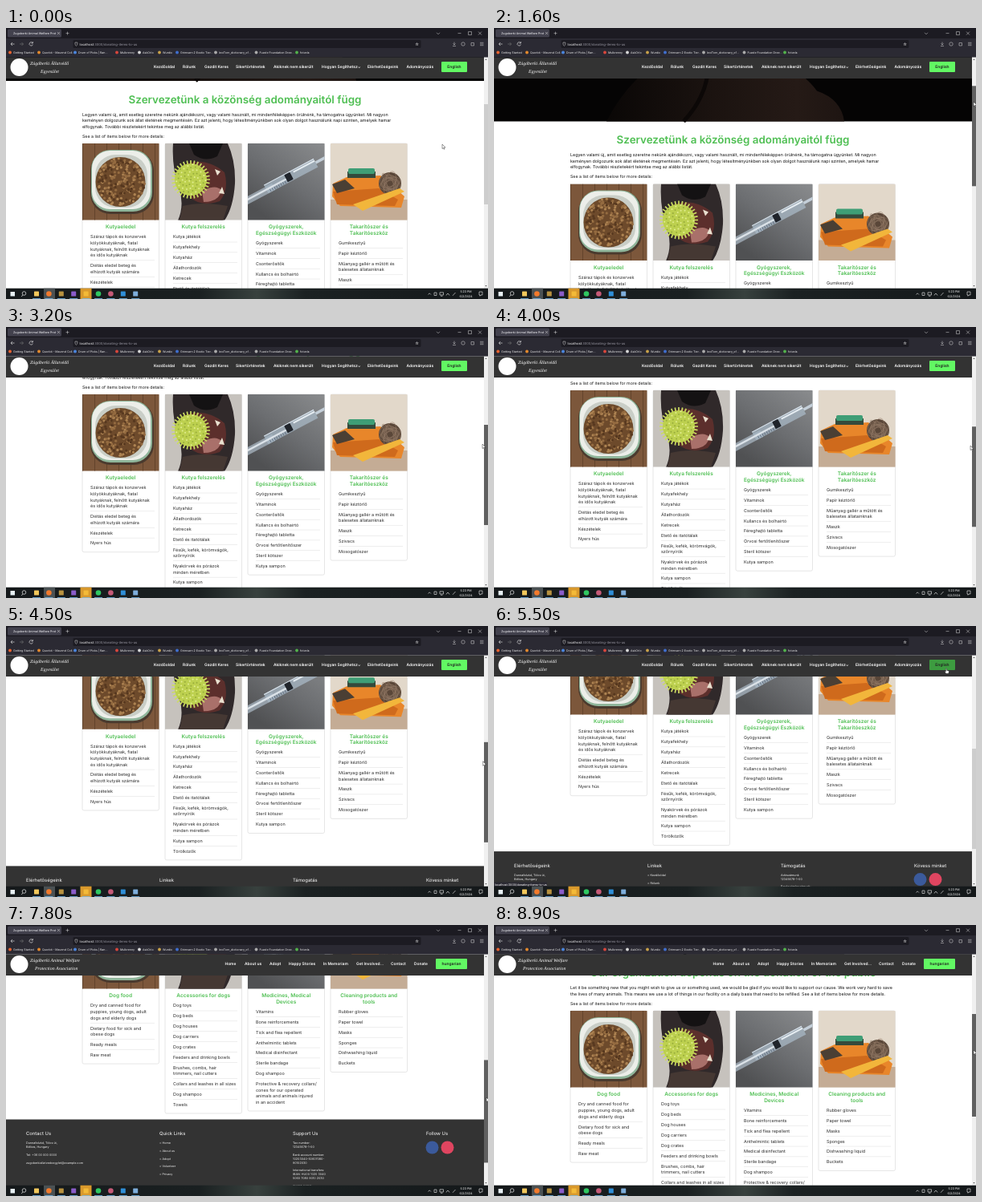
An HTML page for the animation above (9 s loop, 600x338 px).

```html
<!DOCTYPE html>
<html lang="hu">
<head>
<meta charset="utf-8">
<title>Donating items</title>
<style>
html, body { margin: 0; width: 100%; height: 100%; overflow: hidden; background: #fff; }
svg { display: block; }
#stage { width: 100vw; height: 100vh; }
text { font-family: Inter, "Open Sans", sans-serif; text-rendering: geometricPrecision; white-space: pre; }
.script { font-family: "Liberation Serif", serif; font-style: italic; }
</style>
</head>
<body>
<script>
const GREEN = '#4fbf53', INK = '#2b2b2b';
const range = n => [...Array(n).keys()];
let seed = 7;
const rand = () => (seed = seed * 16807 % 2147483647) / 2147483647;

const rect = (x, y, w, h, fill, extra = '') =>
  `<rect x="${x}" y="${y}" width="${w}" height="${h}" fill="${fill}" ${extra}/>`;
const dot = (x, y, r, fill) => `<circle cx="${x}" cy="${y}" r="${r}" fill="${fill}"/>`;
const shape = (d, fill) => `<path d="${d}" fill="${fill}"/>`;
const line = (d, color, w = .6) => `<path d="${d}" fill="none" stroke="${color}" stroke-width="${w}"/>`;
// y is the middle of the capitals
const text = (x, y, size, str, fill = INK, extra = '') =>
  `<text x="${x}" y="${y + size * .36}" font-size="${size}" fill="${fill}" ${extra}>${str.replace(/&/g, '&amp;').replace(/>/g, '&gt;')}</text>`;
const BOLD = 'font-weight="600"', MID = 'text-anchor="middle"';

const photos = [
  // bowl of dry food on a wooden floor
  () => rect(0, 0, 96, 96, '#7c573b') +
    range(7).map(i => rect(i * 15, 0, .7, 96, '#583c26')).join('') +
    rect(10, 9, 79, 79, '#4a3a2e', 'rx="25"') + rect(11, 8, 76, 77, '#8fb59a', 'rx="24"') +
    rect(12, 9, 73, 73, '#eceee9', 'rx="22"') + rect(16, 14, 65, 66, '#c9cec7', 'rx="25"') +
    dot(47.5, 48, 31, '#6d4a2b') +
    range(220).map(() => {
      const a = rand() * 6.283, r = 30 * Math.sqrt(rand());
      return dot(47.5 + r * Math.cos(a), 48 + r * Math.sin(a), 1.6, ['#946b40', '#57381f', '#ad8352'][rand() * 3 | 0]);
    }).join(''),
  // dog with a spiky ball
  () => rect(0, 0, 96, 96, '#c6c2bd') +
    shape('M10 0H78Q88 22 87 50Q85 80 74 96H16Q24 78 18 58Q8 30 10 0Z', '#30292a') +
    shape('M30 0H72L65 16Q50 24 36 14Z', '#141213') +
    shape('M24 26Q50 16 74 36Q80 58 68 72Q44 80 30 66Z', '#5c2f2c') +
    shape('M46 60Q62 50 70 58Q68 73 48 73Z', '#a9706a') +
    shape('M62 32L65 40L69 35ZM67 62L71 54L74 63Z', '#e9e0cf') +
    shape('M22 78Q46 72 78 78L72 96H18Z', '#453833') +
    range(32).map(i => {
      const a = i * Math.PI / 16;
      return line(`M32 45L${32 + 24 * Math.cos(a)} ${45 + 24 * Math.sin(a)}`, '#cbdc62', 1.7);
    }).join('') + dot(32, 45, 20, '#bdd04f') +
    range(58).map(i => {
      const a = i * 2.4, r = 2.5 * Math.sqrt(i);
      return dot(32 + r * Math.cos(a), 45 + r * Math.sin(a), 1, i % 2 ? '#e2ee90' : '#97ac3a');
    }).join(''),
  // syringe
  () => rect(0, 0, 96, 96, 'url(#steel)') +
    `<g transform="translate(51 42) rotate(-28)">` +
    rect(-64, -3, 42, 9, '#a3afbb', 'opacity=".8"') + rect(-32, -6, 70, 12, '#a9b8c6', 'opacity=".75"') +
    rect(-64, -.5, 62, 2.4, '#dbe2e8') + rect(-32, -6, 70, 1, '#dde6ee') +
    rect(-4, -5, 8, 10, '#20242b', 'rx="1"') + rect(8, -4, 30, 2, '#e6edf2') + rect(38, -2, 14, 3.5, '#c4cfd9') +
    range(8).map(i => rect(-28 + i * 3, 2, .6, 3.5, '#4c5a70')).join('') + '</g>',
  // cleaning tools
  () => rect(0, 0, 96, 96, '#e2d8ca') + rect(0, 70, 96, 26, '#c4ac95') +
    shape('M3 50L20 42L62 40L92 66L88 80L12 78L2 66Z', '#e8862a') +
    shape('M3 60L60 56L84 70L80 78L8 76Z', '#cf6a1c') +
    shape('M2 51L18 45L30 56L8 62Z', '#4a3f34') +
    rect(21, 35, 35, 8, '#344a3c') + rect(22, 31, 33, 7, '#3f9e76', 'rx="2"') +
    dot(74, 50, 14, '#5a4739') +
    range(14).map(i => `<ellipse cx="74" cy="50" rx="${6 + i % 5 * 2.4}" ry="${4 + i % 3 * 3}" fill="none" stroke="#927965" stroke-width=".5" transform="rotate(${i * 26} 74 50)"/>`).join('') +
    shape('M28 76L86 56L92 60L40 84Z', '#f2b63b'),
];

const hu = {
  heading: 'Szervezetünk a közönség adományaitól függ',
  intro: [
    'Legyen valami új, amit esetleg szeretne nekünk ajándékozni, vagy valami használt, mi mindenféleképpen örülnénk, ha támogatna ügyünket. Mi nagyon',
    'keményen dolgozunk sok állat életének megmentésén. Ez azt jelenti, hogy létesítményünkben sok olyan dolgot használunk napi szinten, amelyek hamar',
    'elfogynak. További részletekért tekintse meg az alábbi listát.'],
  cards: [
    ['Kutyaeledel', 'Száraz tápok és konzervek|kölyökkutyáknak, fiatal|kutyáknak, felnőtt kutyáknak|és idős kutyáknak', 'Diétás eledel beteg és|elhízott kutyák számára', 'Készételek', 'Nyers hús'],
    ['Kutya felszerelés', 'Kutya játékok', 'Kutyafekhely', 'Kutyaház', 'Állathordozók', 'Ketrecek', 'Etető és itatótálak', 'Fésűk, kefék, körömvágók,|szőrnyírók', 'Nyakörvek és pórázok|minden méretben', 'Kutya sampon', 'Törölközők'],
    ['Gyógyszerek,|Egészségügyi Eszközök', 'Gyógyszerek', 'Vitaminok', 'Csonterősítők', 'Kullancs és bolhairtó', 'Féreghajtó tabletta', 'Orvosi fertőtlenítőszer', 'Steril kötszer', 'Kutya sampon'],
    ['Takarítószer és|Takarítóeszköz', 'Gumikesztyű', 'Papír kéztörlő', 'Műanyag gallér a műtött és|balesetes állatainknak', 'Maszk', 'Szivacs', 'Mosogatószer']],
  footer: ['Elérhetőségeink', 'Linkek', 'Támogatás', 'Kövess minket'],
  links: ['Kezdőoldal', 'Rólunk', 'Gazdit Keres'],
  bank: ['Adószámunk', 'Bankszámlaszámunk:'],
  brand: [[30, 'Zúgóberki Állatvédő'], [43, 'Egyesület']],
  nav: [[184, 'Kezdőoldal'], [220, 'Rólunk'], [247, 'Gazdit Keres'], [286, 'Sikertörténetek'], [333, 'Akiknek nem sikerült'], [393, 'Hogyan Segíthetsz⌄'], [450, 'Elérhetőségeink'], [498.5, 'Adományozás']],
  button: [542, 'English'],
};
const en = {
  heading: 'Our organization depends on the donation of the public',
  intro: [
    'Let it be something new that you might wish to give us or something used, we would be glad if you would like to support our cause. We work very hard to save',
    'the lives of many animals. This means we use a lot of things in our facility on a daily basis that need to be refilled. See a list of items below for more details.'],
  cards: [
    ['Dog food', 'Dry and canned food for|puppies, young dogs, adult|dogs and elderly dogs', 'Dietary food for sick and|obese dogs', 'Ready meals', 'Raw meat'],
    ['Accessories for dogs', 'Dog toys', 'Dog beds', 'Dog houses', 'Dog carriers', 'Dog crates', 'Feeders and drinking bowls', 'Brushes, combs, hair|trimmers, nail cutters', 'Collars and leashes in all sizes', 'Dog shampoo', 'Towels'],
    ['Medicines, Medical|Devices', 'Vitamins', 'Bone reinforcements', 'Tick and flea repellent', 'Anthelmintic tablets', 'Medical disinfectant', 'Sterile bandage', 'Dog shampoo', 'Protective & recovery collars/|cones for our operated|animals and animals injured|in an accident'],
    ['Cleaning products and|tools', 'Rubber gloves', 'Paper towel', 'Masks', 'Sponges', 'Dishwashing liquid', 'Buckets']],
  footer: ['Contact Us', 'Quick Links', 'Support Us', 'Follow Us'],
  links: ['Home', 'About us', 'Adopt', 'Volunteer', 'Privacy'],
  bank: ['Tax number:', 'Bank account number:', 'International transfers:', 'SWIFT CODE:'],
  brand: [[30, 'Zúgóberki Animal Welfare'], [36, 'Protection Association']],
  nav: [[272.5, 'Home'], [297, 'About us'], [328, 'Adopt'], [352, 'Happy Stories'], [395, 'In Memoriam'], [436, 'Get Involved...'], [479, 'Contact'], [508, 'Donate']],
  button: [535, 'hungarian'],
};

function card([title, ...items], i) {
  const x = 95 + i * 103, titles = title.split('|');
  let y = 109 + titles.length * 7.5, out = '';
  titles.forEach((s, k) => out += text(x + 47.7, 104 + k * 7.5, 6.5, s, GREEN, BOLD + MID));
  items.forEach((item, k) => {
    if (k) out += rect(x + 10, y - 6.6, 80, .5, '#ddd');
    const lines = item.split('|');
    lines.forEach((s, n) => out += text(x + 10, y + n * 7.6, 5.45, s));
    y += 12.85 + (lines.length - 1) * 7.6;
  });
  const bottom = y - 1.6;
  return {
    bottom,
    html: rect(x, 0, 95.5, bottom, '#fff', 'rx="2" stroke="#d6d6d6" stroke-width=".6"') +
      `<svg x="${x}" y="0" width="95.5" height="95.5"><use href="#photo${i}"/></svg>` + out,
  };
}

function footer(L, y) {
  const small = (x, dy, s) => text(x, y + dy, 3.7, s, '#eee');
  const numbers = [['12345678-1-00'], ['10203040-50607080-', '90102030'], ['IBAN: HU00 1020 3040', '5060 7080 9010 2030'], []];
  let out = rect(0, y, 595, 150, '#333'), dy = 29.5;
  [25, 191, 357, 523].forEach((x, i) => out += text(x, y + 17.8, 5.9, L.footer[i], '#fff'));
  out += small(25, 29.5, 'Dunnafalvád, Tölcs út,') + small(25, 34.5, 'Bélkes, Hungary') +
    small(25, 44.5, 'Tel: +36 00 000 0000') + small(25, 54.5, 'zugoberkiallatvedoegylet@example.com');
  L.links.forEach((s, i) => out += small(191, 29.5 + i * 9.7, '> ' + s));
  L.bank.forEach((s, i) => [s, ...numbers[i]].forEach((row, k, all) => {
    out += small(357, dy, row);
    dy += k === all.length - 1 ? 9.6 : 4.9;
  }));
  return out + dot(530.5, y + 35, 8, '#3b5a9b') + dot(549.5, y + 35, 8, '#df4560');
}

// dim close-up of a muzzle above the heading
const hero = bottom => `<g transform="translate(0 ${bottom - 150})">` + rect(0, 0, 595, 150, '#050404') +
  shape('M140 150Q170 90 230 60L350 70Q388 92 402 112Q432 122 436 150Z', 'url(#muzzle)') +
  line('M236 150Q262 122 266 90', '#0c0807', 5) + '</g>';

// origin is the top edge of the cards
function page(L) {
  const cards = L.cards.map(card), n = L.intro.length, first = -13.5 - n * 7.5;
  return hero(first - 42) + text(297.5, first - 19, 13.4, L.heading, GREEN, BOLD + MID) +
    L.intro.map((s, i) => text(95, first + i * 7.5, 5.37, s, '#111')).join('') +
    text(95, -9, 5.25, 'See a list of items below for more details:', '#111') +
    cards.map(c => c.html).join('') + footer(L, Math.max(...cards.map(c => c.bottom)) + 7.5);
}

function navBar(L, id) {
  const [x, label] = L.button;
  return L.brand.map(([bx, s], i) => text(bx, 44 + i * 10, 5.9, s, '#fff', 'class="script"')).join('') +
    L.nav.map(([nx, s]) => text(nx, 48.5, 4.9, s, '#fff', BOLD)).join('') +
    rect(x, 42, 574 - x, 13, '#62f863', `rx="1" id="${id}Button"`) +
    text((x + 574) / 2, 48.5, 4.9, label, '#222', BOLD + MID);
}

const bookmarks = [
  [9, 'Getting Started', '#f0642f'], [45, 'Quorbit - Mavend Coll...', '#e58a2c'], [90, 'Drum of Picks | Ran...', '#4a86e0'],
  [142, 'Mulbrenny', '#d9463c'], [170, 'AskOrlo', '#d8d8d8'], [195, 'Wurdix', '#c8a24a'],
  [217, 'Grimvarn 2 Exotic Tier...', '#3f6fd0'], [265, 'lexiTorn_dictionary_of...', '#aaa'],
  [315.5, 'Fuzzle Foundation Dree...', '#aaa'], [366, 'fotvela', '#53b24c']];

const browser = () => rect(0, 0, 600, 13, '#1c1b22') + rect(2, 1.5, 67, 10, '#42414d', 'rx="1.5"') +
  text(9, 6.6, 3.7, 'Zugoberki Animal Welfare Prot', '#fbfbfe') +
  line('M64 5l3 3m0-3l-3 3M74.5 6.6h4m-2-2v4M536 5.8l2 2 2-2M562.5 6.6h4M575.5 4.6h4v4h-4ZM588 4.6l4 4m0-4l-4 4', '#ddd', .5) +
  rect(0, 13, 600, 23.5, '#2b2a33') + rect(83.5, 15, 433, 10, '#1c1b22', 'rx="1.5"') +
  line('M10.5 20H6m2-2l-2 2 2 2M33 18.5a2.2 2.2 0 1 0 .4 2M33.4 17v2h-2', '#eee') +
  line('M17 20h4.5m-2-2l2 2-2 2', '#777') +
  line('M86 18h2.8v2q0 1.6-1.4 2.3Q86 21.6 86 20ZM558 17.5v3.5m-1.5-1.5l1.5 1.5 1.5-1.5M556 22.5h4M579 18.5h3.5v3.5H579ZM590 18.3h4.5M590 20h4.5M590 21.7h4.5', '#ddd', .5) +
  `<circle cx="569" cy="20" r="2.2" fill="none" stroke="#ddd" stroke-width=".5"/>` +
  text(509, 20, 5, '☆', '#ddd') +
  `<text x="91.5" y="21.5" font-size="4.1" fill="#fbfbfe">localhost<tspan fill="#9a99a4">:3000/donating-items-to-us</tspan></text>` +
  bookmarks.map(([x, s, c]) => dot(x - 4, 30.5, 1.9, c) + text(x, 30.6, 3.6, s, '#eee')).join('');

const taskIcons = ['#f1c75b', '#f37a2c', '#b8923f', '#8a5cc9', '#f3ba38', '#2fc761', '#c65a78', '#2f8fd8', '#7eaedb'];
const taskbar = () => rect(0, 324.7, 600, 14, 'url(#desk)') +
  rect(47, 324.7, 14, 14, '#4b5153') + rect(92.5, 324.7, 14, 14, '#d9992c') +
  rect(5.5, 329, 5.5, 5.5, '#e8f1f5') +
  `<circle cx="22.5" cy="331" r="2.3" fill="none" stroke="#eee" stroke-width=".7"/>` + line('M21 333l-1.8 2', '#eee', .7) +
  taskIcons.map((c, i) => {
    const x = 38 + i * 15.4;
    return (i === 1 || i === 5 || i === 6 ? dot(x, 331.5, 3.3, c) : rect(x - 3, 328.5, 6, 6, c, 'rx=".6"')) +
      rect(x - 5, 337.2, 10, .8, '#76b9ed');
  }).join('') +
  line('M525.5 332.5l1.7-1.7 1.7 1.7M533 330h3v3.5h-3ZM540 329.8h4.5v3.2H540ZM541 334.3h2.5M548 333.5q2-4.5 4 0M556 333.8l3.5-3.8M589 329h4v4h-2l-1 1.3V333h-1Z', '#eee', .6) +
  text(572.5, 329, 3.6, '5:23 PM', '#fff', MID) + text(572.5, 334.8, 3.6, '6/2/2024', '#fff', MID);

document.body.innerHTML = `<svg id="stage" viewBox="0 0 600 338"><defs>
  <linearGradient id="steel" x1="1" y1="0" x2=".3" y2="1"><stop stop-color="#8a8c8e"/><stop offset=".55" stop-color="#6c6e71"/><stop offset="1" stop-color="#505153"/></linearGradient>
  <linearGradient id="muzzle"><stop stop-color="#0a0706"/><stop offset=".45" stop-color="#1b1310"/><stop offset=".8" stop-color="#251a16"/><stop offset="1" stop-color="#1e1512"/></linearGradient>
  <linearGradient id="desk"><stop stop-color="#15191b"/><stop offset=".4" stop-color="#1a2021"/><stop offset=".52" stop-color="#38413e"/><stop offset=".62" stop-color="#1b2122"/><stop offset="1" stop-color="#14181a"/></linearGradient>
  ${photos.map((draw, i) => `<g id="photo${i}">${draw()}</g>`).join('')}</defs>
  ${rect(0, 0, 600, 338, '#fff')}
  <g id="huPage">${page(hu)}</g><g id="enPage">${page(en)}</g>
  ${rect(595, 36, 5, 290, '#f0f0f0')}${shape('M596.3 40l1.2-1.6 1.2 1.6ZM596.3 321l1.2 1.6 1.2-1.6Z', '#555')}
  ${rect(595, 95, 5, 125, '#cdcdcd', 'id="thumb"')}
  ${rect(0, 36.5, 595, 26.5, '#333')}${dot(16.5, 49, 11, '#fff')}
  <g id="huNav">${navBar(hu, 'hu')}</g><g id="enNav">${navBar(en, 'en')}</g>
  ${browser()}
  <g id="status">${rect(0, 319.5, 66, 5.5, '#2b2a33')}${text(1, 322.3, 3.7, 'localhost:3000/donating-items-to-us', '#fff')}</g>
  ${taskbar()}
  <g id="cursor" stroke="#000" stroke-width=".4" fill="#fff"><path id="arrow" d="M0 0V5.6L1.3 4.4 2.2 6.3 3 5.9 2.2 4.1H4Z"/>
  <path id="hand" d="M-.6 0Q0-.7.6 0V2.3L3 2.9Q3.6 3.2 3.4 4L2.8 6.3H-.4L-2 3.8Q-1.8 3-.6 3.8Z"/></g></svg>`;

const $ = id => document.getElementById(id);
const show = (id, on) => $(id).setAttribute('display', on ? 'inline' : 'none');

// time, top of the cards, pointer x, pointer y
const path = [
  [0, 144, 543, 145], [700, 144, 597, 118], [900, 144, 597, 118], [1600, 194.5, 597, 92], [1900, 204, 596, 89],
  [2200, 204, 596, 89], [2700, 188, 594, 98], [3200, 84, 593, 146], [3400, 84, 593, 146], [3500, 82, 593, 147],
  [3700, 82, 593, 147], [4000, 79, 593, 148], [4700, 15, 594, 177], [5400, 15, 563, 53], [5800, 15, 563, 53],
  [5900, 7.5, 563, 53], [6700, 7.5, 598, 206], [6800, 7.5, 598, 206], [7800, -16, 598, 215], [8100, -18, 598, 216],
  [8200, -18, 598, 216], [8900, 107, 597, 156], [9000, 107, 597, 156]];

function pose(t) {
  const i = path.findIndex(p => p[0] > t), a = path[i - 1], b = path[i];
  const k = (t - a[0]) / (b[0] - a[0]);
  return a.map((v, n) => v + (b[n] - v) * k).slice(1);
}

function render(now) {
  const t = Math.floor(now % 9000 / 100) * 100;
  const [top, x, y] = pose(t), english = t >= 5900;
  const lang = english ? 'en' : 'hu';
  for (const id of ['hu', 'en']) {
    show(id + 'Page', id === lang);
    show(id + 'Nav', id === lang);
  }
  $(lang + 'Page').setAttribute('transform', `translate(0 ${top})`);

  const dragging = t >= 800 && t <= 4700 || t >= 6800;
  $('thumb').setAttribute('y', english ? 111 + (107 - top) * .467 : 95 + (144 - top) * .45);
  $('thumb').setAttribute('height', english ? 128 : 125);
  $('thumb').setAttribute('fill', dragging ? '#606060' : '#cdcdcd');

  const hover = x > (english ? en : hu).button[0] && x < 574 && y > 42 && y < 55;
  $(lang + 'Button').setAttribute('fill', hover ? '#3d9c40' : '#62f863');
  show('status', hover);
  show('hand', hover);
  show('arrow', !hover);
  $('cursor').setAttribute('transform', `translate(${x} ${y})`);
}

const start = performance.now();
function tick() {
  render(performance.now() - start);
  requestAnimationFrame(tick);
}
tick();
</script>
</body>
</html>
```
